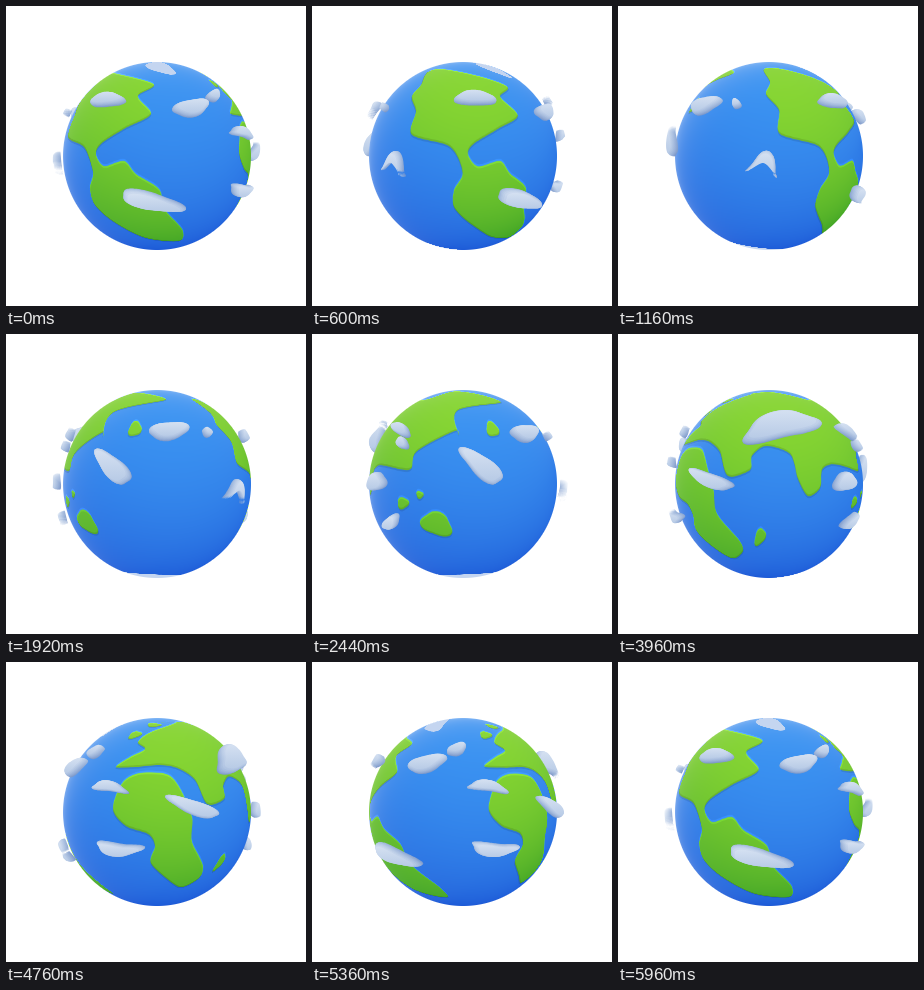
An HTML page with a canvas that plays this animation: 300x300 px, repeating every 6 s.

```html
<!DOCTYPE html>
<html lang="en">
<head>
<meta charset="utf-8">
<title>Spinning globe</title>
<style>
html, body { margin: 0; width: 100%; height: 100%; overflow: hidden; background: #fff; }
canvas { display: block; width: 300px; height: 300px; }
</style>
</head>
<body>
<canvas id="stage" width="300" height="300"></canvas>
<script>
const SIZE = 300, CX = 151, CY = 150, DIST = 5, FOCAL = 460.5;
const LOOP = 6000, STEP = 40, TAU = Math.PI * 2;
const TEX_W = 1080, TEX_H = 540;

// Key coast points in stage pixels, as seen at the given time of the turn.
const AMERICAS = [
  [1160, "146,63 152,76 148,88 161,104 162,128"],
  [0, "78,141 87,166 84,182 89,199 108,216 140,232 173,235 177,225 160,205 153,183 130,168 118,155 98,160 90,148 95,138 118,123 145,108 132,90 146,77 108,67"]
];
const EURASIA = [
  [1920, "128,59 160,65 108,78 97,102"],
  [2960, "194,98 161,117 156,135 122,131 104,130"],
  [3960, "204,136 202,154 190,162 180,145 172,120 148,112 134,122 132,136 110,142 102,118 92,108"],
  [4760, "154,103 130,105 110,105 124,95 139,87 132,80 145,70 170,60"],
  [3960, "110,66 150,58 190,66"]
];
const AFRICA = [
  [4760, "160,112 134,111 117,120 107,147 120,164 142,172 149,184 146,203 173,225 192,217 197,205 186,180 186,155 172,123"]
];
// Blobs: time, centre x, y, half length, half width, tilt in degrees, bend.
const ISLANDS = [
  [4760, 129, 73, 7, 3, -20], [4760, 148, 63, 7, 2, 0],
  [1920, 129, 95, 8, 6, -60], [2960, 180, 190, 15, 12, 0],
  [2960, 146, 170, 8, 6, -20], [2960, 168, 161, 4, 4, 0],
  [3960, 142, 203, 9, 5, -70]
];
const GREENLAND = [0, 155, 62, 15, 5, 15];
const CLOUDS = [
  [0, 101, 93, 17, 6, -6],
  [0, 145, 196, 33, 8, 13],
  [0, 186, 101, 18, 8, -8],
  [0, 208, 89, 6, 5, 0],
  [4760, 103, 125, 18, 5, 8, 3],
  [4760, 112, 187, 24, 6, 6, -4],
  [4760, 188, 145, 28, 7, 20],
  [1160, 146, 158, 16, 6, 12, 18],
  [1160, 118, 97, 4, 4, 0],
  [1920, 163, 96, 20, 8, -6],
  [1920, 106, 133, 23, 10, 45],
  [2960, 138, 92, 16, 5, 20],
  [2960, 147, 107, 8, 5, 30],
  [2960, 130, 191, 14, 6, -25],
  [3960, 228, 148, 11, 9, -30],
  [3960, 162, 92, 40, 13, -12, 4]
];

const angleAt = time => TAU * time / LOOP;
const mix = (a, b, k) => a + (b - a) * k;
const mixAll = (a, b, k) => a.map((c, i) => mix(c, b[i], k));
const clamp = v => Math.min(1, Math.max(0, v));

// Unit vector seen at a stage pixel on a sphere of radius r.
function unproject(px, py, r) {
  const x = (px - CX) / FOCAL, y = (py - CY) / FOCAL, k = x * x + y * y;
  const disc = k * k * DIST * DIST - (1 + k) * (k * DIST * DIST - r * r);
  const z = (k * DIST + Math.sqrt(Math.max(0, disc))) / (1 + k);
  const v = [x * (DIST - z), y * (DIST - z), z];
  const len = Math.hypot(...v);
  return v.map(c => c / len);
}

function turn([x, y, z], a) {
  const c = Math.cos(a), s = Math.sin(a);
  return [x * c + z * s, y, z * c - x * s];
}

function project([x, y, z], r) {
  const k = FOCAL * r / (DIST - z * r);
  return [CX + x * k, CY + y * k];
}

const onGlobe = (px, py, time, r) => turn(unproject(px, py, r), -angleAt(time));

const coast = parts => parts.flatMap(([time, text]) =>
  text.split(" ").map(pair => onGlobe(...pair.split(",").map(Number), time, 1)));

// A tilted, bent ellipse with soft lumps.
function blob([time, x, y, len, wide, tilt, bend = 0], seed, r) {
  const a = tilt * TAU / 360, count = 28;
  return Array.from({ length: count }, (_, i) => {
    const t = i / count * TAU, lump = 1 + 0.12 * Math.sin(3 * t + seed * 1.7);
    const u = len * Math.cos(t) * lump;
    const v = wide * Math.sin(t) * lump + bend * (Math.cos(t) ** 2 - 0.4);
    return onGlobe(x + u * Math.cos(a) - v * Math.sin(a),
                   y + u * Math.sin(a) + v * Math.cos(a), time, r);
  });
}

// Closed curve through all points.
function smoothPath(ctx, pts) {
  const n = pts.length, at = i => pts[(i + n) % n];
  const handle = (p, from, to) => [0, 1].map(i => p[i] + (to[i] - from[i]) / 7);
  ctx.beginPath();
  ctx.moveTo(...pts[0]);
  for (let i = 0; i < n; i++) {
    const a = at(i), b = at(i + 1);
    ctx.bezierCurveTo(...handle(a, at(i - 1), b), ...handle(b, at(i + 2), a), ...b);
  }
  ctx.closePath();
}

// Longitude / latitude masks: red holds land, green holds ice.
function makeTexture() {
  const cv = document.createElement("canvas");
  cv.width = TEX_W;
  cv.height = TEX_H;
  const ctx = cv.getContext("2d", { willReadFrequently: true });
  ctx.fillStyle = "#000";
  ctx.fillRect(0, 0, TEX_W, TEX_H);

  const paint = (vectors, color) => {
    let last = 0;
    const pts = vectors.map(([x, y, z], i) => {
      let lon = Math.atan2(x, z);
      if (i) lon -= TAU * Math.round((lon - last) / TAU);
      last = lon;
      return [(lon / TAU + 0.5) * TEX_W, (Math.asin(y) / Math.PI + 0.5) * TEX_H];
    });
    ctx.fillStyle = color;
    for (let k = -2; k <= 2; k++) {
      smoothPath(ctx, pts.map(([x, y]) => [x + k * TEX_W, y]));
      ctx.fill();
    }
  };
  [AMERICAS, EURASIA, AFRICA].forEach(c => paint(coast(c), "#f00"));
  ISLANDS.forEach((b, i) => paint(blob(b, i, 1), "#f00"));
  paint(blob(GREENLAND, 0, 1), "#0f0");

  // The southern ice cap reaches furthest north on one side.
  for (let x = 0; x < TEX_W; x++) {
    const edge = 75 - 12 * Math.cos((x / TEX_W - 0.5) * TAU + 2.3);
    ctx.fillRect(x, (edge / 180 + 0.5) * TEX_H, 1, TEX_H);
  }

  const data = ctx.getImageData(0, 0, TEX_W, TEX_H).data;
  const channel = c => Float32Array.from({ length: TEX_W * TEX_H }, (_, i) => data[i * 4 + c] / 255);
  return { land: channel(0), ice: channel(1) };
}

function sample(map, u, v) {
  const x0 = Math.floor(u), fx = u - x0;
  const vy = Math.min(TEX_H - 2, Math.max(0, v)), y0 = Math.floor(vy), fy = vy - y0;
  const xa = (x0 % TEX_W + TEX_W) % TEX_W, xb = (xa + 1) % TEX_W;
  const row = y0 * TEX_W, next = row + TEX_W;
  return mix(mix(map[row + xa], map[row + xb], fx), mix(map[next + xa], map[next + xb], fx), fy);
}

const SEA = { dark: [28, 88, 214], light: [58, 146, 241], rim: [190, 216, 250] };
const LAND = { dark: [52, 155, 35], light: [134, 213, 50], rim: [178, 226, 120] };
const ICE_COLOR = [196, 213, 240];

function shade(colors, [x, y, z]) {
  const light = clamp((x * 0.1 - y * 0.65 + z * 0.75 + 0.45) / 1.45);
  const rim = (1 - z) ** 1.8 * clamp(0.45 - 0.55 * y - 0.55 * x);
  return mixAll(mixAll(colors.dark, colors.light, light), colors.rim, rim);
}

// Everything about a globe pixel that does not depend on time.
function makePixels() {
  const list = [], edge = FOCAL / Math.sqrt(DIST * DIST - 1);
  for (let y = 0; y < SIZE; y++) {
    for (let x = 0; x < SIZE; x++) {
      const alpha = clamp(edge + 0.5 - Math.hypot(x + 0.5 - CX, y + 0.5 - CY));
      if (!alpha) continue;
      const n = unproject(x + 0.5, y + 0.5, 1);
      list.push({
        at: (y * SIZE + x) * 4,
        alpha: alpha * 255,
        u: (Math.atan2(n[0], n[2]) / TAU + 0.5) * TEX_W - 0.5,
        v: (Math.asin(n[1]) / Math.PI + 0.5) * TEX_H - 0.5,
        sea: shade(SEA, n),
        land: shade(LAND, n)
      });
    }
  }
  return list;
}

function makeCloud(row, seed) {
  const pts = blob(row, seed, 1.08);
  const sum = [0, 1, 2].map(i => pts.reduce((total, p) => total + p[i], 0));
  const len = Math.hypot(...sum);
  return { pts, mid: sum.map(c => c / len) };
}

const stage = document.getElementById("stage").getContext("2d");
const globe = document.createElement("canvas");
globe.width = globe.height = SIZE;
const globeCtx = globe.getContext("2d");
const image = globeCtx.createImageData(SIZE, SIZE);
const texture = makeTexture();
const pixels = makePixels();
const clouds = CLOUDS.map(makeCloud);

function paintGlobe(time) {
  const shift = time / LOOP * TEX_W, out = image.data;
  for (const p of pixels) {
    const u = p.u - shift;
    const land = sample(texture.land, u, p.v), ice = sample(texture.ice, u, p.v);
    const slope = sample(texture.land, u, p.v + 3) - sample(texture.land, u, p.v - 3);
    const bevel = 1 + slope * 0.1;
    for (let i = 0; i < 3; i++) {
      out[p.at + i] = mix(mix(p.sea[i], p.land[i], land) * bevel, ICE_COLOR[i], ice);
    }
    out[p.at + 3] = p.alpha;
  }
  globeCtx.putImageData(image, 0, 0);
}

const LAYERS = 8;
function paintCloud(cloud, angle) {
  const mid = turn(cloud.mid, angle), pts = cloud.pts.map(p => turn(p, angle));
  for (let i = 0; i < LAYERS; i++) {
    const k = i / (LAYERS - 1), r = 1.04 + 0.065 * k, scale = 1 - 0.2 * k ** 3;
    const ring = pts.map(p => project(mixAll(mid, p, scale), r));
    const ys = ring.map(p => p[1]);
    const fill = stage.createLinearGradient(0, Math.min(...ys), 0, Math.max(...ys));
    fill.addColorStop(0, `rgb(${mixAll([160, 184, 220], [212, 224, 241], k).map(Math.round)})`);
    fill.addColorStop(1, `rgb(${mixAll([122, 150, 200], [184, 203, 230], k).map(Math.round)})`);
    stage.fillStyle = fill;
    smoothPath(stage, ring);
    stage.fill();
  }
}

function draw(time) {
  const angle = angleAt(time), horizon = 0.16;
  const depth = c => turn(c.mid, angle)[2];
  const sorted = [...clouds].sort((a, b) => depth(a) - depth(b));
  paintGlobe(time);
  stage.fillStyle = "#fff";
  stage.fillRect(0, 0, SIZE, SIZE);
  sorted.filter(c => depth(c) < horizon).forEach(c => paintCloud(c, angle));
  stage.drawImage(globe, 0, 0);
  sorted.filter(c => depth(c) >= horizon).forEach(c => paintCloud(c, angle));
}

const start = performance.now();
let shown = -1;
function tick() {
  const time = Math.floor((performance.now() - start) % LOOP / STEP) * STEP;
  if (time !== shown) draw(shown = time);
  requestAnimationFrame(tick);
}
tick();
</script>
</body>
</html>
```
